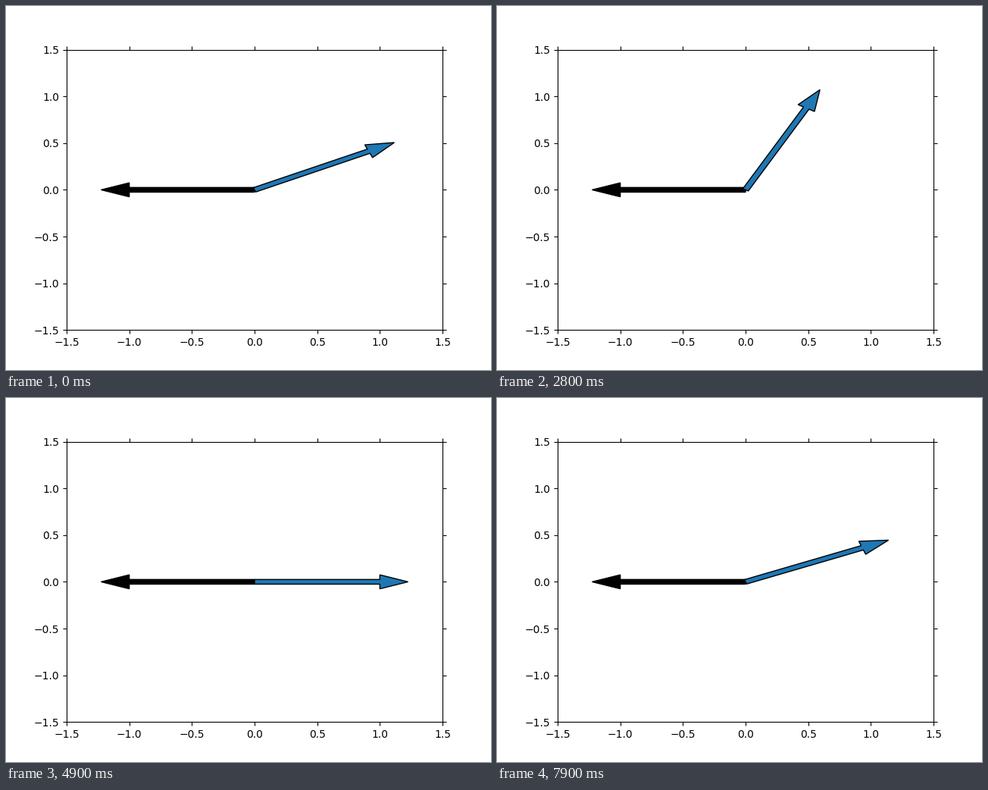
Animation, 640 px wide and 480 px high, one loop 8 s. Source, as a matplotlib script:

```python
import numpy as np
import matplotlib.pyplot as plt
from matplotlib.animation import FuncAnimation

FRAMES = 80
INTERVAL = 100
STEPS = 59          # the half circle is divided into this many steps
REST = 8            # step at which the needle begins

# Sweeps: first frame, last frame, step reached, skew (below 1 starts faster)
SWEEPS = [
    (5, 7, 6, 1), (9, 12, 3, 1), (12, 16, 7, 1), (18, 19, 8, 1),
    (19, 22, 3, 1), (24, 36, STEPS, 0.92), (41, 49, 0, 0.87),
    (51, 53, 13, 1), (54, 59, 57, 0.62), (60, 61, STEPS, 1),
    (70, 75, 0, 0.32), (77, 79, 7, 1),
]


def ease(t, skew):
    u = np.clip(t, 0, 1) ** skew
    return u * u * (3 - 2 * u)


def needle_angle(frame):
    step = REST
    for start, end, goal, skew in SWEEPS:
        step += (goal - step) * ease((frame - start) / (end - start), skew)
    return np.pi * np.round(step) / STEPS


def draw_arrow(ax, angle, color):
    return ax.arrow(0, 0, np.cos(angle), np.sin(angle), width=0.05,
                    facecolor=color, edgecolor="black")


fig, ax = plt.subplots(figsize=(6.4, 4.8), dpi=100)
ticks = np.arange(-1.5, 2, 0.5)
ax.set(xlim=(-1.5, 1.5), ylim=(-1.5, 1.5), xticks=ticks, yticks=ticks)
ax.tick_params(top=True, right=True)

draw_arrow(ax, np.pi, "black")
needle = draw_arrow(ax, needle_angle(0), "C0")


def update(frame):
    angle = needle_angle(frame)
    needle.set_data(dx=np.cos(angle), dy=np.sin(angle))
    return [needle]


anim = FuncAnimation(fig, update, frames=FRAMES, interval=INTERVAL,
                     init_func=lambda: update(0), repeat=True, repeat_delay=0)
plt.show()
```
